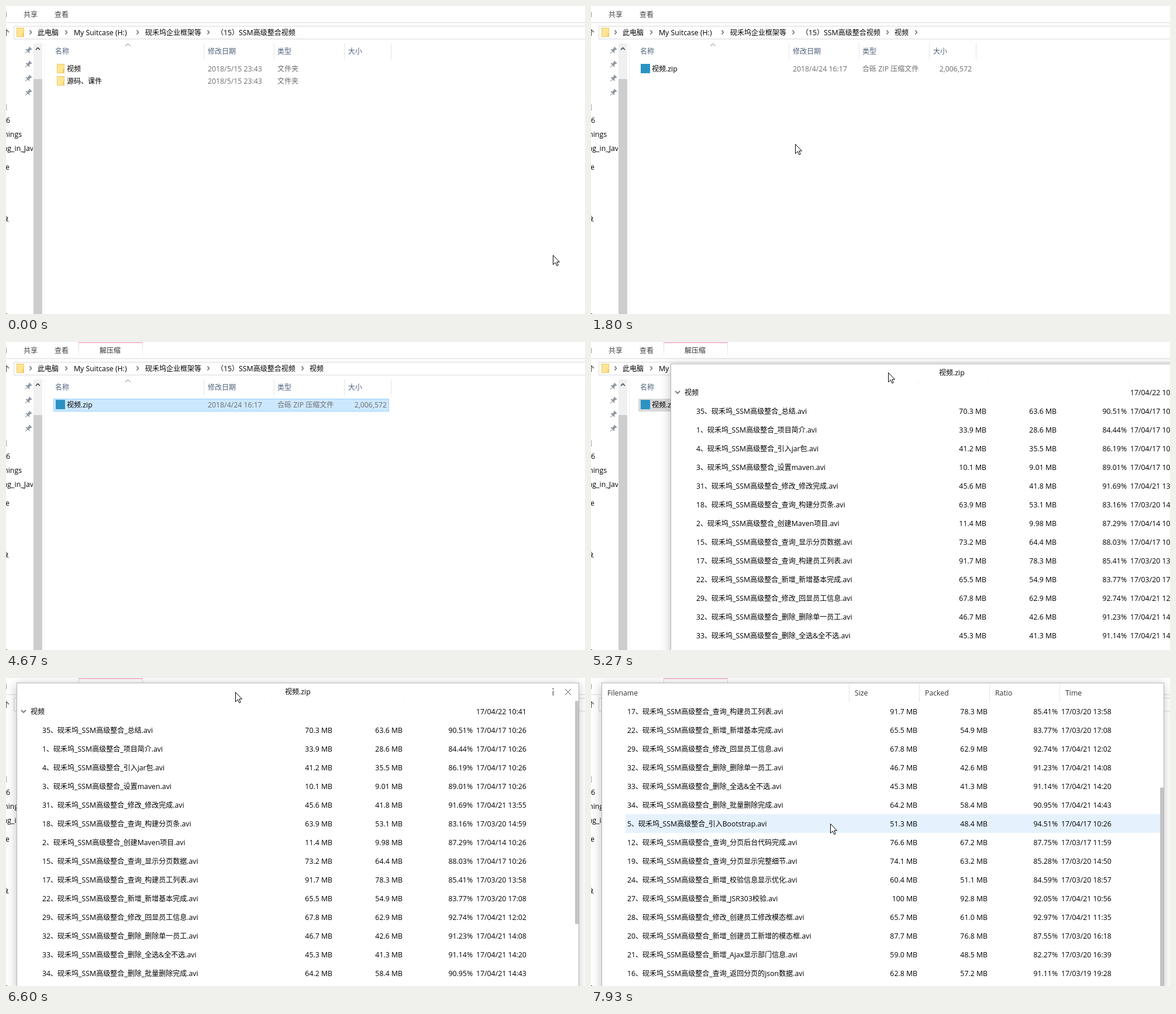
These frames come from a looping animation (990 by 527 pixels, 8 s). An HTML page with a canvas:

```html
<!DOCTYPE html>
<html lang="zh-CN">
<head>
<meta charset="utf-8">
<title>文件夹</title>
<style>
html, body { margin: 0; width: 100%; height: 100%; overflow: hidden; background: #fff; }
canvas { display: block; }
</style>
</head>
<body>
<canvas id="stage" width="990" height="527"></canvas>
<script>
const ctx = document.getElementById('stage').getContext('2d');
const LOOP = 8000, ROW = 32, WIN_W = 961;
const LATIN = '12.3px "Open Sans", "Noto Sans", sans-serif';
const HAN = '12px "Noto Sans CJK SC", "Noto Sans CJK", sans-serif';
const GREY = '#6d6d6d', LINE = '#e5e5e5';

// number | title | size | packed | ratio | time
const files = `35|总结|70.3|63.6|90.51|04/17 10:26
1|项目简介|33.9|28.6|84.44|04/17 10:26
4|引入jar包|41.2|35.5|86.19|04/17 10:26
3|设置maven|10.1|9.01|89.01|04/17 10:26
31|修改_修改完成|45.6|41.8|91.69|04/21 13:55
18|查询_构建分页条|63.9|53.1|83.16|03/20 14:59
2|创建Maven项目|11.4|9.98|87.29|04/14 10:26
15|查询_显示分页数据|73.2|64.4|88.03|04/17 10:26
17|查询_构建员工列表|91.7|78.3|85.41|03/20 13:58
22|新增_新增基本完成|65.5|54.9|83.77|03/20 17:08
29|修改_回显员工信息|67.8|62.9|92.74|04/21 12:02
32|删除_删除单一员工|46.7|42.6|91.23|04/21 14:08
33|删除_全选&全不选|45.3|41.3|91.14|04/21 14:20
34|删除_批量删除完成|64.2|58.4|90.95|04/21 14:43
5|引入Bootstrap|51.3|48.4|94.51|04/17 10:26
12|查询_分页后台代码完成|76.6|67.2|87.75|03/17 11:59
19|查询_分页显示完整细节|74.1|63.2|85.28|03/20 14:50
24|新增_校验信息显示优化|60.4|51.1|84.59|03/20 18:57
27|新增_JSR303校验|100|92.8|92.05|04/21 10:56
28|修改_创建员工修改模态框|65.7|61.0|92.97|04/21 11:35
20|新增_创建员工新增的模态框|87.7|76.8|87.55|03/20 16:18
21|新增_Ajax显示部门信息|59.0|48.5|82.27|03/20 16:39
16|查询_返回分页的json数据|62.8|57.2|91.11|03/19 19:28
10|基础模块_修改Mapper文件|71.3|59.5|83.48|04/17 10:26
23|新增_jQuery前端校验完成|54.3|46.5|85.55|03/20 18:25
8|SSM整合配置_配置Spring|73.8|63.3|85.75|04/17 10:26
9|SSM整合配置_配置MyBatis|58.2|50.6|86.94|04/17 10:26
11|基础模块_测试Mapper|66.4|56.1|84.49|04/17 10:26
30|修改_更新员工数据|62.5|57.0|91.20|04/21 13:10`
  .split('\n').map(line => line.split('|'));

// Pointer path: time, x, y; the pointer is hidden in the gaps below
const path = [
  [0, 935, 426], [870, 500, 126], [930, 500, 112], [1470, 500, 112],
  [1800, 349, 236], [2070, 219, 111], [3470, 220, 111], [3870, 459, 178],
  [4930, 640, 170], [5130, 523, 56], [5200, 523, 56], [5530, 393, 24],
  [5860, 393, 24], [5865, 392, 24], [6600, 392, 24], [6870, 416, 250],
  [7070, 415, 258], [7330, 412, 254], [7470, 412, 254], [7930, 409, 249]
];
const hidden = [[3070, 3530], [3870, 4930]];
const wheelDown = [6870, 6930, 7000, 7070, 7200];
const wheelUp = [7600, 7800];

const clamp = (v, lo, hi) => Math.min(hi, Math.max(lo, v));

function pointerAt(t) {
  const next = path.findIndex(p => p[0] > t);
  if (next < 0) return path[path.length - 1].slice(1);
  const [t0, x0, y0] = path[next - 1], [t1, x1, y1] = path[next];
  const u = (t - t0) / (t1 - t0), s = u * u * (3 - 2 * u);
  return [Math.round(x0 + (x1 - x0) * s), Math.round(y0 + (y1 - y0) * s)];
}

function scrollAt(t) {
  const passed = list => list.filter(v => v <= t).length;
  return 3 * (passed(wheelDown) - passed(wheelUp));
}

function box(x, y, w, h, color) {
  ctx.fillStyle = color;
  ctx.fillRect(x, y, w, h);
}

function line(points, color, width = 1) {
  ctx.beginPath();
  points.forEach(([x, y]) => ctx.lineTo(x, y));
  ctx.strokeStyle = color;
  ctx.lineWidth = width;
  ctx.stroke();
}

// Draws mixed Latin and Han text around the vertical centre y
function text(str, x, y, color = '#000', right = false) {
  const runs = str.split(/([\x00-\x7f]+)/).filter(Boolean).map(s => {
    const font = s.charCodeAt(0) < 128 ? LATIN : HAN;
    ctx.font = font;
    return { s, font, w: ctx.measureText(s).width };
  });
  if (right) x -= runs.reduce((sum, r) => sum + r.w, 0);
  ctx.fillStyle = color;
  for (const r of runs) {
    ctx.font = r.font;
    ctx.fillText(r.s, x, y + 5);
    x += r.w;
  }
}

function folder(x, y) {
  box(x, y, 13, 16, '#e9c766');
  box(x + 1, y + 1, 11, 14, '#ffe694');
  box(x + 10, y + 9, 3, 7, '#f3cd62');
}

function pin(y) {
  ctx.save();
  ctx.translate(38, y);
  ctx.rotate(Math.PI / 4);
  box(-3, -6, 6, 2, '#87929c');
  box(-2, -4, 4, 4, '#87929c');
  box(-4, 0, 8, 2, '#87929c');
  box(-0.5, 2, 1, 5, '#87929c');
  ctx.restore();
}

const crumbArrow = x => line([[x - 1.5, 41.5], [x + 1.5, 45], [x - 1.5, 48.5]], '#555', 1.2);

function explorerTop(t) {
  line([[0, 28.5], [990, 28.5]], '#dadbdc');
  line([[0.5, 10], [0.5, 19]], '#999');
  text('共享', 30, 14, '#444');
  text('查看', 83, 14, '#444');
  if (t >= 2400) {
    const fade = ctx.createLinearGradient(0, 0, 0, 24);
    fade.addColorStop(0, '#d8d3d6');
    fade.addColorStop(1, '#f4f2f3');
    box(124, 0, 1, 22, fade);
    box(233, 0, 1, 22, fade);
    box(124, 0, 110, 2, '#f6bfd2');
    text('解压缩', 160, 14, '#333');
  }
  ctx.strokeStyle = '#d9d9d9';
  ctx.lineWidth = 1;
  ctx.strokeRect(13.5, 34.5, 1000, 22);
  line([[0.5, 40], [0.5, 51]], '#666', 1.5);
  line([[-4, 45], [0.5, 40.5], [5, 45]], '#666', 1.5);
  folder(18, 37);
  const inside = t >= 1470;
  const crumbs = [['此电脑', 54], ['My Suitcase (H:)', 116], ['砚禾坞企业框架等', 238], ['（15）SSM高级整合视频', 360]];
  crumbs.forEach(([name, x]) => text(name, x, 45));
  [42, 103, 225, 346].forEach(crumbArrow);
  if (inside) {
    text('视频', 519, 45);
    crumbArrow(507);
    if (t < 4670) crumbArrow(556);
  }
}

function sidebar() {
  [76, 100, 124, 148].forEach(pin);
  ctx.save();
  ctx.beginPath();
  ctx.rect(0, 60, 46, 467);
  ctx.clip();
  text('造', -10, 172, '#234');
  text('6', 0, 195);
  text('hings', 27, 219, '#000', true);
  text('ng_in_Jav', 47, 243, '#000', true);
  text('e', -1, 275);
  text('象', -7, 364);
  ctx.restore();
  box(0, 526, 2, 1, '#3b6b3b');
  box(47, 64, 15, 463, '#f0f0f0');
  box(47, 125, 15, 402, '#cdcdcd');
  line([[51, 75], [54.5, 71.5], [58, 75]], '#444', 1.6);
  box(65, 64, 1, 463, '#f3f3f3');
}

function highlight(y, fill, edge) {
  box(81, y, 574, 22, edge || fill);
  if (edge) box(82, y + 1, 572, 20, fill);
}

function fileList(t, pointer) {
  [['名称', 84], ['修改日期', 345], ['类型', 464], ['大小', 585]]
    .forEach(([name, x]) => text(name, x, 77, '#4c607a'));
  [338, 458, 578, 658].forEach(x => box(x, 64, 1, 27, LINE));
  line([[204.5, 68.5], [208.5, 64.5], [212.5, 68.5]], '#777');

  const over = pointer && pointer[0] < 655 && pointer[1];
  if (t < 1470) {
    if (over >= 118 && over < 140) highlight(118, '#e5f3ff');
    if (over >= 97 && over < 118) {
      if (t >= 1270) highlight(97, '#cce8ff', '#99d1ff');
      else highlight(97, '#e5f3ff');
    }
    ['视频', '源码、课件'].forEach((name, i) => {
      const y = 107 + 21 * i;
      folder(87, y - 8);
      text(name, 104, y);
      text('2018/5/15 23:43', 345, y, GREY);
      text('文件夹', 464, y, GREY);
    });
    return;
  }
  if (t >= 4730) highlight(97, '#d9d9d9');
  else if (t >= 2270) highlight(97, '#cce8ff', '#99d1ff');
  else if (over >= 97 && over < 119) highlight(97, '#e5f3ff');
  box(85, 99, 16, 16, '#2a93c4');
  text('视频.zip', 104, 107);
  text('2018/4/24 16:17', 345, 107, GREY);
  text('合砾 ZIP 压缩文件', 464, 107, GREY);
  text('2,006,572', 651, 107, GREY, true);
}

function archiveRow(i, y) {
  if (i === 0) {
    line([[8, y - 2], [12, y + 2], [16, y - 2]], '#777', 1.8);
    text('视频', 24, y);
    text('17/04/22 10:41', 786, y);
    return;
  }
  const file = files[i - 1];
  if (!file) return;
  const [no, name, size, packed, ratio, time] = file;
  text(`${no}、砚禾坞_SSM高级整合_${name}.avi`, 44, y);
  text(size + ' MB', 540, y, '#000', true);
  text(packed + ' MB', 660, y, '#000', true);
  text(ratio + '%', 780, y, '#000', true);
  text('17/' + time, 786, y);
}

function archiveWindow(t, pointer) {
  // The window trails the dragging pointer by a few milliseconds
  const [hx, hy] = pointerAt(clamp(t - 5, 5200, 6500));
  const left = hx - 374, top = hy - 15, first = scrollAt(t);
  const overY = pointer ? pointer[1] - top : -1;
  const titled = overY >= 0 && overY < ROW;

  ctx.save();
  ctx.translate(left, top);
  ctx.save();
  ctx.shadowColor = 'rgba(0,0,0,0.25)';
  ctx.shadowBlur = 16;
  ctx.shadowOffsetY = 2;
  box(0, 0, WIN_W, 730, '#fff');
  ctx.restore();

  if (overY >= ROW) box(41, Math.floor(overY / ROW) * ROW, 914, ROW, '#e5f2fd');
  for (let k = 0; k < 16; k++) archiveRow(first + k, 48 + ROW * k);

  const thumb = 19.8 * first, thumbTop = Math.max(30, thumb);
  ctx.fillStyle = '#c4c4c4';
  ctx.beginPath();
  ctx.roundRect(955, thumbTop, 6, thumb + 412 - thumbTop, 2);
  ctx.fill();

  [424, 544, 664, 784].forEach(x => box(x - 1, titled ? 30 : 1, 1, titled ? 2 : 31, LINE));
  if (titled) {
    text('视频.zip', 459, 14);
    box(916, 8, 3, 3, '#aaa');
    box(916, 13, 3, 8, '#aaa');
    line([[938, 10], [948, 20]], '#999', 1.4);
    line([[948, 10], [938, 20]], '#999', 1.4);
  } else {
    [['Filename', 10], ['Size', 433], ['Packed', 553], ['Ratio', 673], ['Time', 793]]
      .forEach(([name, x]) => text(name, x, 16, '#333'));
  }
  ctx.strokeStyle = '#b4b4b4';
  ctx.lineWidth = 1;
  ctx.strokeRect(0.5, -0.5, WIN_W, 731);
  ctx.restore();
}

function arrow([x, y]) {
  ctx.save();
  ctx.translate(x + 0.5, y + 0.5);
  ctx.beginPath();
  [[0, 0], [0, 16], [3.7, 12.5], [6.3, 18], [8.7, 17], [6.2, 11.5], [11, 11.5]]
    .forEach(([px, py]) => ctx.lineTo(px, py));
  ctx.closePath();
  ctx.fillStyle = '#fff';
  ctx.fill();
  ctx.strokeStyle = '#000';
  ctx.lineWidth = 1;
  ctx.stroke();
  ctx.restore();
}

function draw(t) {
  const gone = hidden.some(([from, to]) => t >= from && t < to);
  const pointer = gone ? null : pointerAt(t);
  box(0, 0, 990, 527, '#fff');
  explorerTop(t);
  sidebar();
  fileList(t, pointer);
  if (t >= 4870) archiveWindow(t, pointer);
  if (pointer) arrow(pointer);
}

const start = performance.now();
function tick() {
  const ms = Math.max(0, performance.now() - start) % LOOP;
  // 15 pictures per second, times rounded to 10 ms
  const step = Math.floor((ms + 4) * 15 / 1000) % 120;
  draw(Math.round(step * 100 / 15) * 10);
  requestAnimationFrame(tick);
}
tick();
</script>
</body>
</html>
```
